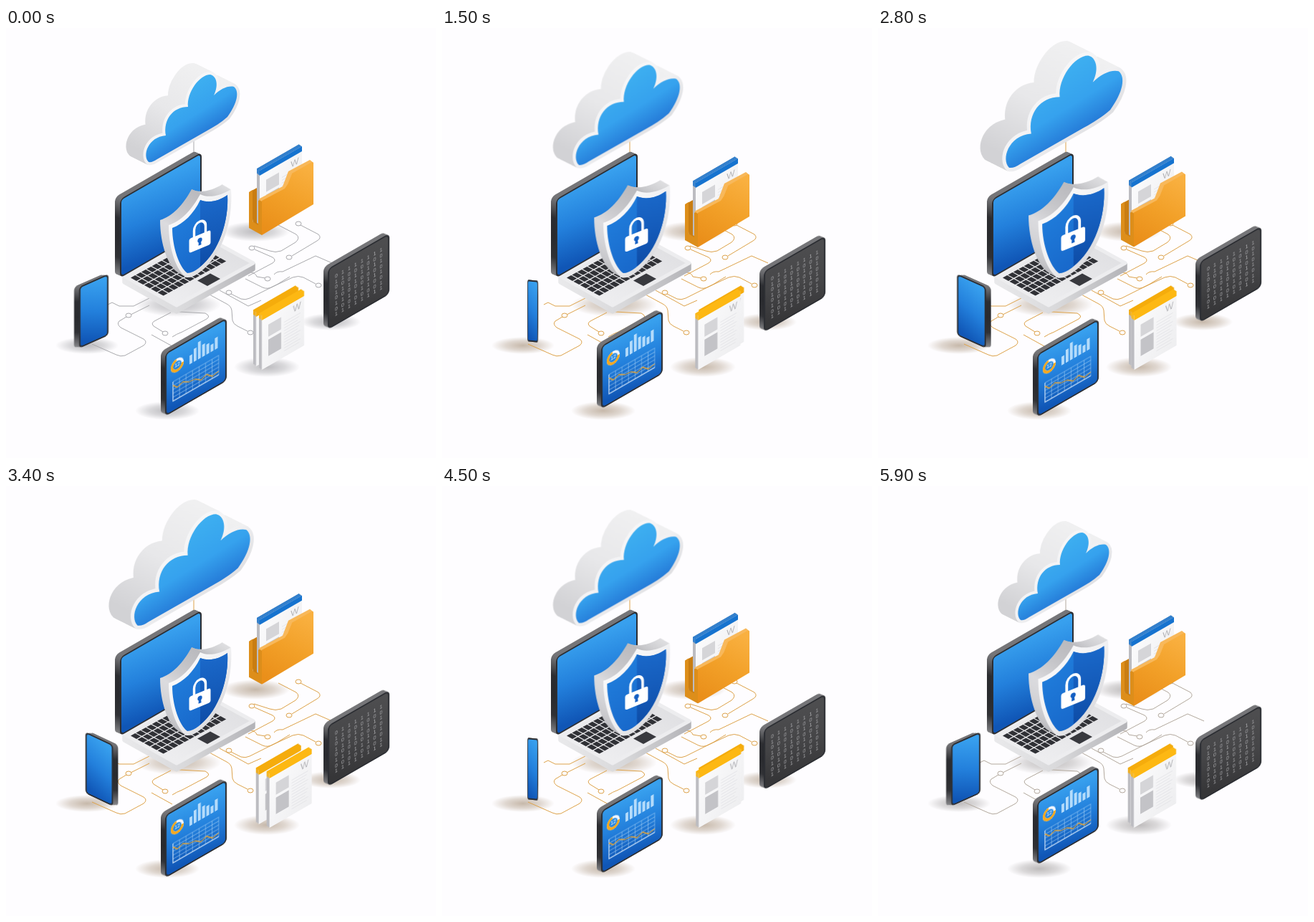
Animation of 600x600 px, one loop 6000 ms. Source, as an HTML page:

```html
<!DOCTYPE html>
<html lang="en">
<head>
<meta charset="utf-8">
<title>Cloud data security</title>
<style>
  html, body { margin: 0; width: 100%; height: 100%; overflow: hidden; background: #fefdff; }
  svg { display: block; width: 100%; height: 100%; }
  text { font-family: "Liberation Sans", Arial, sans-serif; }
  .digits { font: 6.8px "Liberation Mono", monospace; fill: #adadb0; text-anchor: middle; }

  .cloud, .shield, .folder, .page-front, .page-back, .board, .chart, .phone, .depth, .half, .turn, .lean {
    animation: 6s cubic-bezier(.37, 0, .63, 1) infinite;
  }
  .cloud { animation-name: grow; transform-origin: 255.6px 159px; }
  .shield { animation-name: pulse; animation-duration: 3s; transform-origin: 256px 340px; }
  .folder { animation-name: hover; }
  .page-front { animation-name: slide; }
  .page-back { animation-name: follow; animation-duration: 3s; }
  .board { animation-name: bob; }
  .chart { animation-name: drift; }
  .phone { animation-name: shift; }
  .depth { animation-name: depth; }
  .half { animation-name: half; }
  .turn { animation-name: turn; }
  .lean { animation-name: lean; }
  .wires { fill: none; stroke: #a9a9ad; stroke-width: 1; animation: wires 6s linear infinite; }
  .wires circle { fill: #fefdff; }
  .shade { stop-color: #98989c; animation: shade 6s linear infinite; }

  @keyframes grow { 50% { transform: scale(1.285); } }
  @keyframes pulse {
    0%, 32% { transform: scale(1); }
    66%, 99.9% { transform: scale(1.12, 1.09); }
    100% { transform: scale(1); }
  }
  @keyframes hover {
    0% { transform: translateY(0); }
    11.7%, 35.8%, 60%, 85% { transform: translateY(-19px); }
    23.8%, 48.3%, 72.5%, 97.5%, 100% { transform: translateY(18px); }
  }
  @keyframes slide {
    0%, 23.8%, 48.3%, 72.5%, 97.5%, 100% { transform: translateX(0); }
    11.7%, 35.8%, 60%, 85% { transform: translateX(13px); }
  }
  @keyframes follow {
    0%, 100% { transform: translateX(0); }
    40% { transform: translateX(15px); }
    70% { transform: translateX(8px); }
    95% { transform: translateX(5px); }
  }
  @keyframes bob {
    0% { transform: translateY(0); }
    16.67%, 50%, 83.33% { transform: translateY(-13px); }
    33.33%, 66.67%, 100% { transform: translateY(20px); }
  }
  @keyframes drift {
    0% { transform: translateY(0); }
    15% { transform: translateY(-12px); }
    63% { transform: translateY(6px); }
    93%, 100% { transform: translateY(-13px); }
  }
  @keyframes shift {
    0%, 100% { transform: translate(122.5px, 395px); }
    50% { transform: translate(130.5px, 395px); }
  }
  @keyframes depth {
    0%, 14%, 86%, 100% { transform: translateX(-7px); }
    35%, 65% { transform: translateX(7px); }
  }
  @keyframes half {
    0%, 14%, 86%, 100% { transform: translateX(-3.5px); }
    35%, 65% { transform: translateX(3.5px); }
  }
  @keyframes turn {
    0%, 50% { transform: scaleX(1); animation-timing-function: cubic-bezier(.12, 0, .39, 0); }
    25%, 75% { transform: scaleX(.35); animation-timing-function: cubic-bezier(.61, 1, .88, 1); }
    100% { transform: scaleX(1); }
  }
  @keyframes lean {
    0%, 14%, 86%, 100% { transform: skewY(-24deg); }
    35%, 65% { transform: skewY(24deg); }
  }
  @keyframes wires { 10%, 90% { stroke: #dda24a; } }
  @keyframes shade { 10%, 90% { stop-color: #a8937c; } }
</style>
</head>
<body>
<svg id="stage" viewBox="0 0 600 600"></svg>
<script>
const SLOPE = .577;
const range = (n, f) => Array.from({ length: n }, (_, i) => f(i)).join('');
const poly = (points, fill, extra = '') => `<polygon points="${points}" fill="${fill}" ${extra}/>`;
const rect = (x, y, w, h, fill, r = 0) =>
  `<rect x="${x}" y="${y}" width="${w}" height="${h}" rx="${r}" fill="${fill}"/>`;
const path = (d, fill, extra = '') => `<path d="${d}" fill="${fill}" ${extra}/>`;
const group = (name, body) => `<g class="${name}">${body}</g>`;
const skewed = (x, y, body, slope = SLOPE) =>
  `<g transform="matrix(1 ${-slope} 0 1 ${x} ${y})">${body}</g>`;

// Copies of a shape from (dx, dy) towards the origin make a solid side.
const sweep = (n, dx, dy, body) => range(n, i => {
  const k = 1 - i / n;
  return `<g transform="translate(${(dx * k).toFixed(2)} ${(dy * k).toFixed(2)})">${body}</g>`;
});

function gradient(id, dir, ...stops) {
  const [x1, y1, x2, y2] = dir;
  return `<linearGradient id="${id}" x1="${x1}" y1="${y1}" x2="${x2}" y2="${y2}">` +
    stops.map((c, i) => `<stop offset="${i / (stops.length - 1)}" stop-color="${c}"/>`).join('') +
    '</linearGradient>';
}

const defs = `<defs>
  ${gradient('sky', [.3, .15, .72, .8], '#3fb2f1', '#36a2ee', '#1a62ca')}
  ${gradient('screen', [.6, 0, .4, 1], '#38a0ee', '#2380dc', '#1056b6')}
  ${gradient('slate', [.7, 0, .3, 1], '#4d4d4f', '#454547', '#363638')}
  ${gradient('metal', [0, 0, 0, 1], '#77777a', '#2c2d31', '#292a2e', '#303135', '#8a8a8d')}
  ${gradient('puff', [.7, 0, .2, 1], '#f0f0f1', '#e8e8ea', '#d2d2d5')}
  ${gradient('rim', [0, 0, 1, 1], '#ffffff', '#f1f1f3', '#c9c9cd')}
  ${gradient('edge', [0, 0, 1, .3], '#e6e6e9', '#b9b9bd', '#e6e6e8')}
  ${gradient('left', [0, 0, .6, 1], '#2385e2', '#1765c8')}
  ${gradient('right', [.3, 0, .4, 1], '#1b6acb', '#155cbb', '#0d4ba5')}
  ${gradient('deck', [0, 1, 1, 0], '#f2f2f4', '#dcdcdf')}
  ${gradient('base', [0, 0, 1, 0], '#e9e9eb', '#d8d8da', '#b4b4b8')}
  ${gradient('card', [.7, 0, .3, 1], '#f9b040', '#f2a028', '#ea8f1a')}
  ${gradient('paper', [0, 0, 1, 1], '#fbfbfc', '#eeeef0')}
  <radialGradient id="shadow">
    <stop class="shade" offset="0" stop-opacity=".65"/>
    <stop class="shade" offset=".55" stop-opacity=".36"/>
    <stop class="shade" offset="1" stop-opacity="0"/>
  </radialGradient>
</defs>`;

const shadow = (x, y, rx, ry) =>
  `<ellipse cx="${x}" cy="${y}" rx="${rx}" ry="${ry}" fill="url(#shadow)"/>`;

const shadows = shadow(113, 443, 44, 12) + shadow(348, 284, 48, 14) + shadow(364, 473, 46, 14) +
  shadow(225, 534, 45, 13) + shadow(453, 410, 42, 12) + shadow(240, 386, 60, 17);

function wires() {
  const lines = `M142 386L148 383L158 388H178L200 377
    M174 400L200 387M168 403L158 409Q154 413 160 418L192 434Q198 438 192 443L166 457Q160 459 154 456L120 441
    M219 424L206 416Q202 412 207 409L230 397
    M242 396L278 398Q286 402 280 406L246 424Q238 427 232 431M203 428L232 444
    M284 372L308 385Q314 388 315 394L316 408Q317 413 323 416L337 423
    M298 366L338 388L356 380
    M314 371L328 378Q334 380 340 377L378 358L396 347
    M362 349L350 347Q348 341 340 341L322 338
    M432 357L415 348Q408 345 400 348L372 361Q365 365 358 362L334 350
    M347 309L372 320Q378 324 372 328L338 346
    M374 344Q378 339 386 340L432 318L455 328
    M411 275L436 288Q441 293 434 297L399 318
    M380 275L405 288Q411 293 404 299L384 311Q376 314 368 311L346 304M262 156V175`;
  const nodes = [[171, 401], [222, 426], [341, 425], [311, 369], [365, 350], [436, 359], [343, 307], [395, 320], [408, 273]];
  return group('wires', `<path d="${lines}"/>` +
    nodes.map(([x, y]) => `<ellipse cx="${x}" cy="${y}" rx="4" ry="3" fill="#fefdff"/>`).join(''));
}

const tablet = (x, y, w, h, fill, body = '', depth = -6) => skewed(x, y,
  sweep(6, depth, depth, rect(0, 0, w, h, 'url(#metal)', 6)) +
  rect(0, 0, w, h, '#2c2e33', 6) + rect(2, 2, w - 4, h - 4, fill, 4) + body);

function laptop() {
  const deck = '165,346 238,387 345,328 270,287';
  const round = c => `stroke="${c}" stroke-width="5" stroke-linejoin="round"`;
  const cell = (u, v, du, dv, fill) => {
    const p = (a, b) => `${(174 + a + b).toFixed(1)},${(348.5 + .55 * (b - a)).toFixed(1)}`;
    return poly([p(u, v), p(u + du, v), p(u + du, v + dv), p(u, v + dv)].join(' '), fill);
  };
  return sweep(9, 0, 9, poly(deck, 'url(#base)', round('url(#base)'))) +
    poly(deck, 'url(#deck)', round('#ededef')) +
    range(60, i => cell(i % 12 * 7.4, (i / 12 | 0) * 9.4, 6.2, 8, '#303136')) +
    cell(43, 50, 18, 14, '#38393e') +
    tablet(159, 239, 114, 110, 'url(#screen)', '', -7);
}

function cloud() {
  const d = 'M199 187C190 178 198 152 223 150C219 128 233 110 254 110C252 90 270 65 285 65' +
    'C294 67 297 80 290 94C299 85 310 80 318 82C326 88 323 105 309 124C300 132 290 138 281 143L211 183Q204 188 199 187Z';
  const line = c => `stroke="${c}" stroke-width="8" stroke-linejoin="round"`;
  return group('cloud', sweep(24, -24, -12, path(d, 'url(#puff)', line('url(#puff)'))) +
    path(d, '#e2e2e5', line('url(#rim)')) + path(d, 'url(#sky)'));
}

function shield() {
  const outer = 'M227 275C244 270 259 254 271 232C283 238 300 234 314 225C317 270 302 318 270 341Q260 349 252 348C238 340 227 308 227 275Z';
  const inner = 'M232 279C248 273 262 259 271 240C284 245 298 241 309 233C311 268 298 312 269 335Q260 342 253 342C242 334 232 306 232 279Z';
  const half = 'M271 240C284 245 298 241 309 233C311 268 298 312 271 333Z';
  const lock = path('M-8 -4V-15A8 9 0 0 1 8 -15V-4', 'none', 'stroke="#fff" stroke-width="3.4"') +
    rect(-15, -6, 30, 20, '#fff', 3) + '<circle cy="2" r="3.2" fill="#1560c4"/>' +
    path('M-1.5 3H1.5L2 9H-2Z', '#1560c4');
  return group('shield', sweep(14, -12, -7, path(outer, 'url(#edge)')) +
    path(outer, 'url(#rim)') + path(inner, 'url(#left)') + path(half, 'url(#right)') +
    skewed(270.5, 294, lock, .42));
}

const page = (x, y, bar) => skewed(x, y,
  sweep(5, -4, -5, rect(0, 0, 59, 76, '#bcbcc1') + rect(0, 0, 59, 7, bar)) +
  rect(0, 0, 59, 76, 'url(#paper)') + rect(0, 0, 59, 7, bar) +
  '<text x="49" y="21" font-size="12" text-anchor="middle" fill="#b4b4b8">W</text>' +
  rect(9, 18, 18, 17, '#d5d5d8') + rect(9, 39, 18, 23, '#c3c3c7') +
  range(11, i => rect(31, 27 + i * 4, 23 - i % 3 * 2, .8, '#e2e2e5')));

function folder() {
  const wall = '339,229 344,226 344,270 352,275 352,241 357,238 357,289 339,279';
  const front = '357,241 389,224 393,218 399,203 427,187 429,188 429,246 357,289';
  return group('folder', poly('341,228 352,222 352,275 345,279', '#c97d12') +
    page(354, 199, '#1673cf') + poly(wall, '#dd8e1a') +
    poly('352,239 386,221 394,200 424,184 429,188 399,204 391,224 357,242', '#f8b85a') +
    poly(front, 'url(#card)'));
}

function chart() {
  const heights = [12, 18, 24, 17, 14, 10, 16];
  const grid = range(8, i => `M${11 + i * 9.1} 46v27`) + range(6, i => `M11 ${46 + i * 5.4}h64`);
  const body = '<circle cx="17" cy="26" r="7.5" fill="none" stroke="#f2f7ff" stroke-width="3.4"/>' +
    '<circle cx="17" cy="26" r="7.5" fill="none" stroke="#f5a81c" stroke-width="3.4" stroke-dasharray="34 14"/>' +
    '<text x="17" y="28.5" font-size="7" text-anchor="middle" fill="#fff">12</text>' +
    heights.map((h, i) => rect(34 + i * 5.9, 35 - h, 4, h, '#b5dcfb')).join('') +
    path(grid, 'none', 'stroke="#b9dcfa" stroke-width=".6" opacity=".85"') +
    path('M11 46V73H75', 'none', 'stroke="#e8f4ff" stroke-width="1"') +
    path('M11 51L17 57L25 54L33 59L42 60L50 66L58 63L66 70L75 68', 'none', 'stroke="#eda52c" stroke-width="1.2"');
  return group('chart', tablet(222, 454, 86, 88, 'url(#screen)', body));
}

function board() {
  const digits = range(64, i => {
    const col = i % 8, row = i / 8 | 0;
    const bit = Math.sin(col * 12.9 + row * 78.2) > 0 ? 1 : 0;
    return `<text x="${12 + col * 8.9}" y="${19 + row * 7.6}">${bit}</text>`;
  });
  return group('board', tablet(449, 336, 86, 85, 'url(#slate)', group('digits', digits)));
}

function phone() {
  const pose = body => group('turn', group('lean', body));
  const shell = fill => rect(-20.5, -43, 41, 86, fill, 5);
  const side = pose(shell('url(#metal)'));
  const face = shell('#2c2e33') + rect(-18.5, -41, 37, 82, 'url(#screen)', 3.5);
  return group('phone', group('depth', side) + group('half', side) + pose(face));
}

document.getElementById('stage').innerHTML = defs + shadows + wires() + laptop() + cloud() + shield() +
  folder() + board() + group('page-back', page(349, 396, '#f5ac0c')) +
  group('page-front', page(357, 401, '#fdb813')) + chart() + phone();
</script>
</body>
</html>
```
